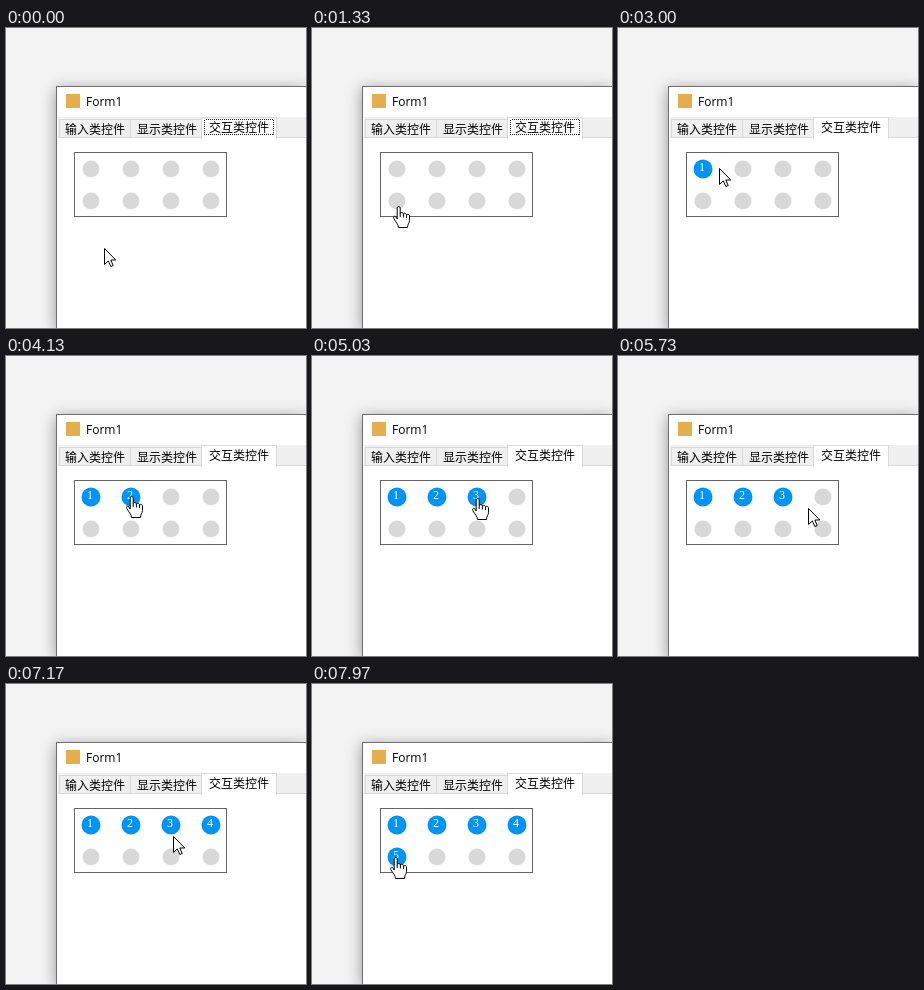
An HTML page for the animation above (8 s loop, 300 by 300 pixels).

```html
<!DOCTYPE html>
<html lang="zh-CN">
<head>
<meta charset="utf-8">
<title>Form1</title>
<style>
  html, body { margin: 0; width: 100%; height: 100%; overflow: hidden; background: #f3f3f3; }
  .stage { position: relative; width: 300px; height: 300px; overflow: hidden; contain: strict; }
  .window {
    position: absolute; left: 50px; top: 58px; right: 0; bottom: 0;
    background: #fff; box-shadow: 0 3px 14px rgba(0, 0, 0, .4);
  }
  svg { position: absolute; left: 0; top: 0; display: block; overflow: hidden; }
  rect, .line { shape-rendering: crispEdges; }
  .title { font: 12px "Open Sans", sans-serif; }
  .tabs { font: 12px "Noto Sans CJK SC", "Noto Sans CJK", "Noto Sans CJK JP", sans-serif; }
  .digit { font: 12px "Liberation Serif", serif; fill: #fff; text-anchor: middle; }
  .cursor { fill: #fff; stroke: #000; stroke-linejoin: round; }
</style>
</head>
<body>
<div class="stage">
<div class="window"></div>
<svg width="300" height="300" viewBox="0 0 300 300">
  <path class="line" d="M300 58.5H50.5V300" fill="none" stroke="#707070"/>
  <rect x="60" y="66" width="14" height="14" fill="#e3ae4b"/>
  <text class="title" x="80" y="78">Form1</text>

  <rect x="52" y="89" width="248" height="20" fill="#f0f0f0"/>
  <path class="line" d="M53.5 109V91.5H195.5M124.5 91V109M52 109.5H300" fill="none" stroke="#d9d9d9"/>
  <rect x="195.5" y="89.5" width="75" height="21" fill="#fff" stroke="#d9d9d9"/>
  <rect x="196" y="109" width="74" height="3" fill="#fff"/>
  <g class="tabs">
    <text x="59" y="106">输入类控件</text>
    <text x="131" y="106">显示类控件</text>
    <text x="203" y="104">交互类控件</text>
  </g>
  <rect id="focus" x="198.5" y="91.5" width="69" height="15" fill="none" stroke="#222" stroke-dasharray="1" stroke-dashoffset="1"/>

  <rect x="68.5" y="124.5" width="152" height="64" fill="#fff" stroke="#646464"/>
  <g id="dots"></g>

  <path id="arrow" class="cursor" d="M.5 .5V16.5L4.3 12.9L6.8 18.5L9.2 17.5L6.8 12H11.8Z"/>
  <g id="hand" class="cursor">
    <path d="M4.2 13V2C4.2 0 7.2 0 7.2 2V7.5C7.2 6 10.4 6.2 10.4 8C10.6 6.9 13.5 7.1 13.5 8.9C13.7 8 16.5 8.2 16.5 10V14.5C16.5 17 14.5 18 14.5 21.5H5.5C5.5 18.5 3 16.5 .8 12.6C-.1 10.5 1.8 9.6 2.8 10.8L4.2 13"/>
    <path d="M7.2 7.5V11M10.4 8V11.5M13.5 9V12" fill="none"/>
  </g>
</svg>
</div>
<script>
const LOOP = 8000;
const HOME = { x: 98, y: 220 };

// Pointer moves; sag bends the way downwards, click follows the move
const MOVES = [
  { from: 430, to: 1330, x: 87, y: 178, power: 3 },
  { from: 1330, to: 1700, x: 86, y: 143, click: 1930 },
  { from: 2770, to: 3400, x: 126, y: 140, sag: -2, click: 3800 },
  { from: 4130, to: 4870, x: 166, y: 142, sag: 8, click: 4970 },
  { from: 5330, to: 6100, x: 212, y: 140, sag: 11, click: 6570 },
  { from: 6900, to: 7670, x: 84, y: 173, click: 7930 }
];
const CLICKS = MOVES.map(m => m.click).filter(Boolean);

const $ = id => document.getElementById(id);
const show = (node, on) => { node.style.display = on ? "" : "none"; };

function add(parent, tag, attrs, text = "") {
  const node = document.createElementNS("http://www.w3.org/2000/svg", tag);
  for (const key in attrs) node.setAttribute(key, attrs[key]);
  node.textContent = text;
  parent.append(node);
  return node;
}

const dots = Array.from({ length: 8 }, (_, i) => {
  const x = 85 + i % 4 * 40, y = 141 + (i >> 2) * 32;
  const disc = add($("dots"), "circle", { cx: x, cy: y });
  const digit = add($("dots"), "text", { x: x - 1, y: y + 2, class: "digit" }, i + 1);
  return { x, y, disc, digit };
});

function pointerAt(t) {
  let { x, y } = HOME;
  for (const { from, to, power = 1, sag = 0, ...end } of MOVES) {
    if (t < from) break;
    const k = Math.min(1, (t - from) / (to - from)) ** power;
    x += (end.x - x) * k;
    y += (end.y - y) * k + sag * Math.sin(Math.PI * k);
  }
  return [Math.round(x), Math.round(y)];
}

function draw(t) {
  const [x, y] = pointerAt(t);
  const over = dots.some(d => Math.hypot(x - d.x, y - d.y) <= 10);
  $("arrow").setAttribute("transform", `translate(${x} ${y})`);
  $("hand").setAttribute("transform", `translate(${x - 6} ${y})`);
  show($("arrow"), !over);
  show($("hand"), over);
  show($("focus"), t < CLICKS[0]);
  dots.forEach(({ disc, digit }, i) => {
    const on = t >= CLICKS[i];
    disc.setAttribute("r", on ? 9.5 : 8.5);
    disc.setAttribute("fill", on ? "#0094f6" : "#d8d8d8");
    show(digit, on);
  });
}

const start = performance.now();
function tick() {
  draw((performance.now() - start) % LOOP);
  requestAnimationFrame(tick);
}
tick();
</script>
</body>
</html>
```
